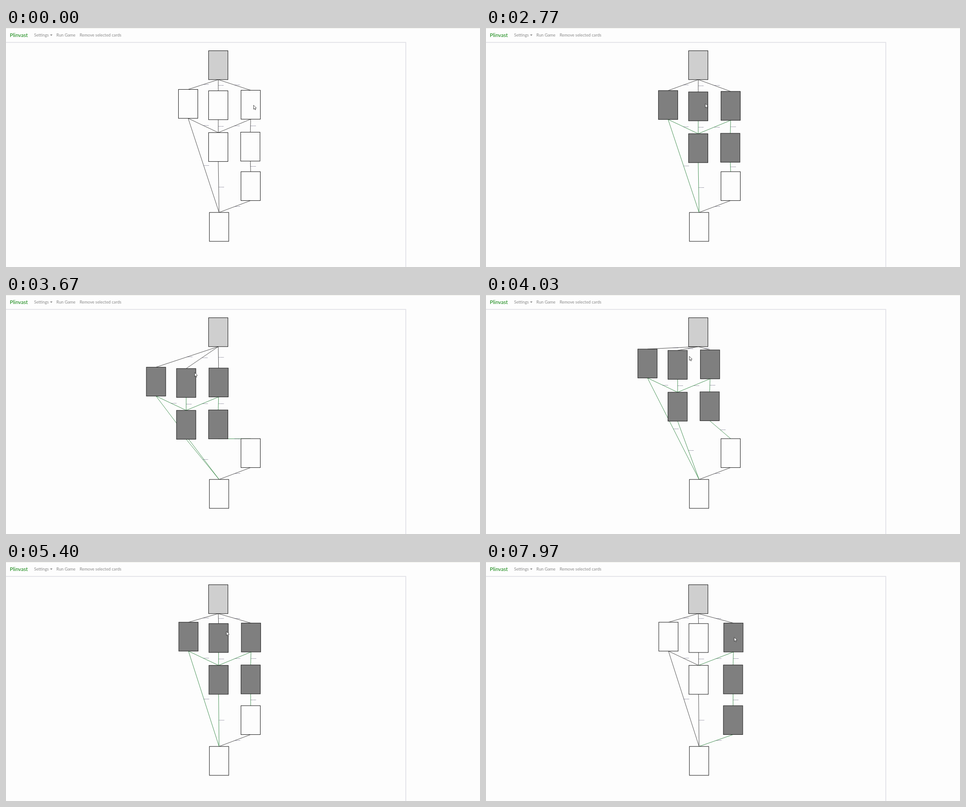
Write an HTML page with a canvas that moves like this. It is 1054 px wide and 531 px high and loops after 8 s.

```html
<!DOCTYPE html>
<html lang="en">
<head>
<meta charset="utf-8">
<style>
  html, body { margin: 0; width: 100%; height: 100%; overflow: hidden; background: #fdfdfd; }
  canvas { display: block; width: 1054px; height: 531px; }
</style>
</head>
<body>
<canvas></canvas>
<script>
const LOOP = 8000, LAG = 70, W = 43, H = 64.2;
const canvas = document.querySelector('canvas');
const ratio = window.devicePixelRatio || 1;
canvas.width = 1054 * ratio;
canvas.height = 531 * ratio;
const ctx = canvas.getContext('2d');

const cards = {
  a: [450.5, 50.5], b: [383.5, 136.5], c: [450.5, 139.5], d: [522.6, 138.4],
  e: [450.5, 232.4], f: [521.8, 231.5], g: [522.5, 319.2], h: [452.3, 409.8]
};
const edges = ['ab', 'ac', 'ad', 'be', 'ce', 'de', 'df', 'bh', 'eh', 'fg', 'gh'];

// Eased pointer moves; the last two values are the destination
const home = [550.5, 171.5];
const moves = [
  { from: 120, to: 600, x: 601.5, y: 136.5 },
  { from: 760, to: 1600, x: 420.5, y: 243.5 },
  { from: 1650, to: 1950, x: 378, y: 290 },
  { from: 2050, to: 2500, x: 489.5, y: 157 },
  { from: 4500, to: 5000, x: 490.2, y: 154.3 },
  { from: 5800, to: 6400, x: 604.7, y: 150 },
  { from: 6580, to: 6680, x: 599, y: 128 },
  { from: 6740, to: 7090, x: 512, y: 390 },
  { from: 7150, to: 7440, x: 546.6, y: 167.3 },
  { from: 7550, to: 7750, x: 552, y: 167.3 }
];
const swing = { from: 2680, to: 4500 };
const drags = [
  { group: 'bcdef', press: 760, select: 2000, grab: 2600, drop: 5500, clear: 6450 },
  { group: 'dfg', press: 6740, select: 7150, grab: 7550, drop: LOOP, clear: LOOP }
];

const clamp = (v, lo, hi) => Math.min(hi, Math.max(lo, v));
const progress = (t, { from, to }) => clamp((t - from) / (to - from), 0, 1);
const ease = k => k * k * (3 - 2 * k);

function pointer(t) {
  let [x, y] = home;
  for (const move of moves) {
    const k = ease(progress(t, move));
    x += (move.x - x) * k;
    y += (move.y - y) * k;
  }
  // One tilted elliptical sweep while the first group is dragged
  const a = 2 * Math.PI * progress(t, swing);
  const away = 1 - Math.cos(a);
  return [x - 35.7 * away, y + 34 * Math.sin(a) + 12.6 * away];
}

function place(id, t) {
  let [x, y] = cards[id];
  for (const { group, grab, drop } of drags) {
    if (!group.includes(id)) continue;
    const start = pointer(grab), now = pointer(clamp(t - LAG, grab, drop));
    x += now[0] - start[0];
    y += now[1] - start[1];
  }
  return [x, y];
}

function isSelected(id, t) {
  return drags.some(d => d.group.includes(id) && t >= d.select && t < d.clear);
}

function line(x0, y0, x1, y1, color, width) {
  ctx.strokeStyle = color;
  ctx.lineWidth = width;
  ctx.beginPath();
  ctx.moveTo(x0, y0);
  ctx.lineTo(x1, y1);
  ctx.stroke();
}

function box(x, y, w, h, color, width) {
  ctx.strokeStyle = color;
  ctx.lineWidth = width;
  ctx.strokeRect(x, y, w, h);
}

function text(str, x, y, size, color) {
  ctx.font = `${size}px Lato, sans-serif`;
  ctx.fillStyle = color;
  ctx.fillText(str, x, y);
}

function polygon(x, y, points, color) {
  ctx.beginPath();
  points.forEach(([px, py]) => ctx.lineTo(x + px, y + py));
  ctx.closePath();
  ctx.fillStyle = color;
  ctx.fill();
}

function drawPage() {
  ctx.fillStyle = '#fdfdfd';
  ctx.fillRect(0, 0, 1054, 531);
  line(0, 0.5, 1054, 0.5, '#ebebe4', 1);
  line(0, 32, 890, 32, '#e4e4e9', 2);
  line(889, 32, 889, 531, '#e4e4e9', 2);
  text('Plinvast', 8.6, 20, 11.7, '#0a830a');
  text('Settings', 62.4, 19.4, 9.3, '#8a8a8a');
  text('Run Game', 112, 19.4, 9.3, '#8a8a8a');
  text('Remove selected cards', 163.7, 19.4, 9.3, '#8a8a8a');
  polygon(98, 14.4, [[0, 0], [5.4, 0], [2.7, 2.8]], '#777');
}

function drawEdge([from, to], t) {
  const [x0, y0] = place(from, t), [x1, y1] = place(to, t);
  line(x0 + W / 2, y0 + H, x1 + W / 2, y1, isSelected(from, t) ? '#17752a' : '#222', 0.8);
  text('Placeholder', (x0 + x1 + W) / 2, (y0 + H + y1) / 2 + 0.6, 2.4, '#141038');
}

function drawCard(id, t) {
  const [x, y] = place(id, t);
  ctx.fillStyle = isSelected(id, t) ? '#7f7f7f' : id === 'a' ? '#cfcfcf' : '#fdfdfd';
  ctx.fillRect(x, y, W, H);
  box(x, y, W, H, '#1c1c1c', 1.05);
}

function drawMarquee({ press, select }, t) {
  if (t < press || t >= select) return;
  const [x0, y0] = pointer(press);
  const [x1, y1] = pointer(Math.max(press, t - LAG));
  box(x0, y0, x1 - x0, y1 - y0, '#4a4a4a', 0.8);
}

function drawPointer([x, y]) {
  polygon(x, y, [[0, 0], [0, 9], [2, 7.2], [3.4, 10.3], [4.8, 9.7], [3.5, 6.7], [6.3, 6.4]], '#fff');
  ctx.strokeStyle = '#222';
  ctx.lineWidth = 0.8;
  ctx.stroke();
}

function frame(now) {
  const t = now % LOOP;
  ctx.setTransform(ratio, 0, 0, ratio, 0, 0);
  drawPage();
  edges.forEach(edge => drawEdge(edge, t));
  Object.keys(cards).forEach(id => drawCard(id, t));
  drags.forEach(drag => drawMarquee(drag, t));
  drawPointer(pointer(t));
  requestAnimationFrame(frame);
}
requestAnimationFrame(frame);
</script>
</body>
</html>
```
